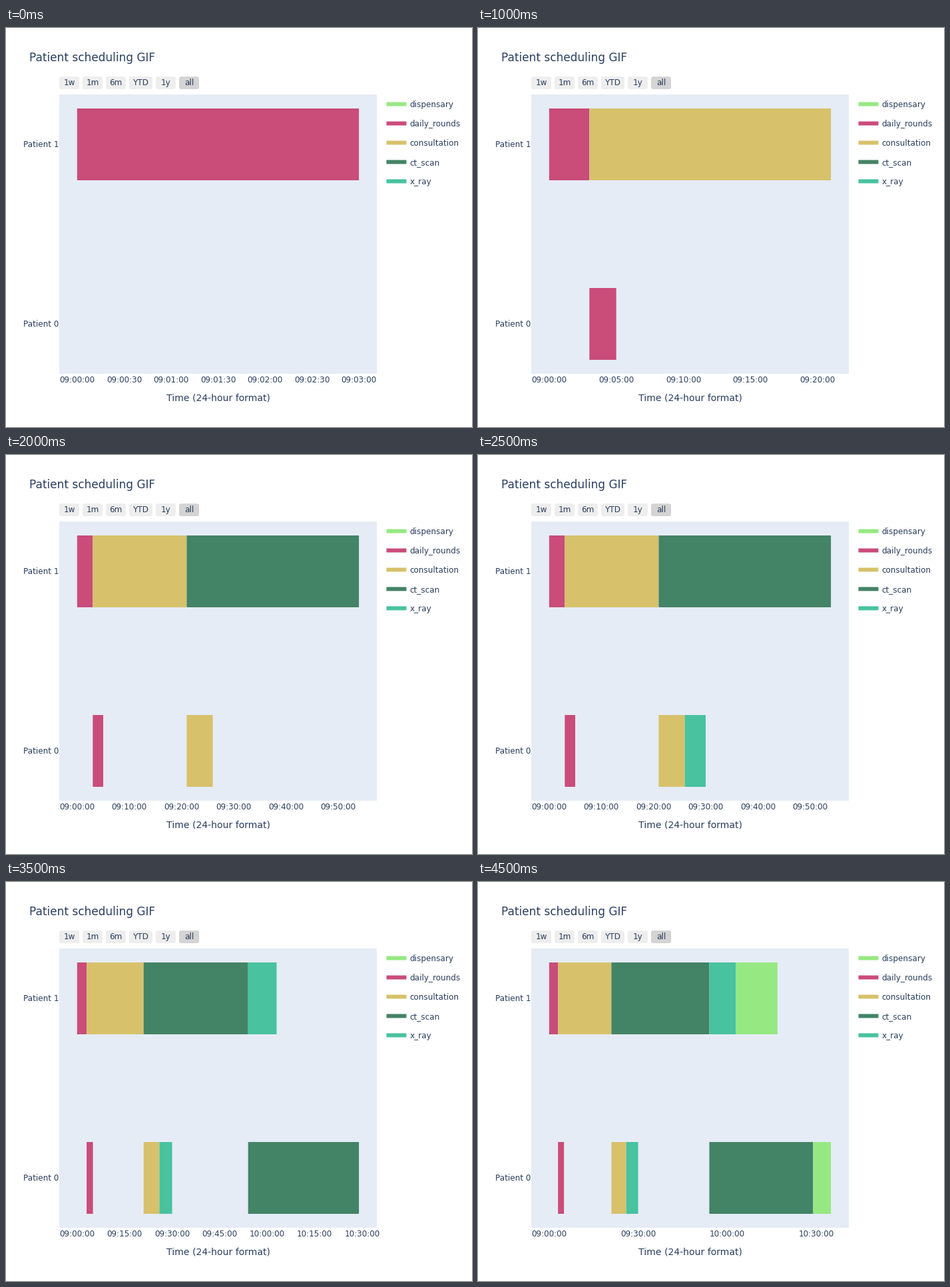
Animation, 700 px wide and 600 px high, one loop 5000 ms. Source, as a matplotlib script:

```python
import matplotlib.pyplot as plt
from matplotlib.animation import FuncAnimation
from matplotlib.patches import FancyBboxPatch, Rectangle

W, H, DPI = 700, 600, 100
INK = "#2a3f5f"
COLORS = {
    "dispensary": "#96e982",
    "daily_rounds": "#c94c79",
    "consultation": "#d7c16b",
    "ct_scan": "#438366",
    "x_ray": "#48c29f",
}
# (patient, task, start minute, end minute), in order of appearance
TASKS = [
    (1, "daily_rounds", 0, 3),
    (1, "consultation", 3, 21),
    (0, "daily_rounds", 3, 5),
    (0, "consultation", 21, 26),
    (1, "ct_scan", 21, 54),
    (0, "x_ray", 26, 30),
    (0, "ct_scan", 54, 89),
    (1, "x_ray", 54, 63),
    (1, "dispensary", 63, 77),
    (0, "dispensary", 89, 95),
]
STEPS = [0.5, 1, 2, 5, 10, 15, 30, 60]
PLOT_L, PLOT_T, PLOT_W, PLOT_H = 80, 100, 477, 420
PAD = 0.05 * PLOT_W + 3
ROW_Y = {1: 175, 0: 445}
BAR_H = 108

plt.rcParams.update({
    "font.family": "DejaVu Sans",
    "text.color": INK,
    "text.hinting": "force_autohint",
})
fig = plt.figure(figsize=(W / DPI, H / DPI), dpi=DPI, facecolor="white")
ax = fig.add_axes([0, 0, 1, 1])
ax.set_xlim(0, W)
ax.set_ylim(H, 0)
ax.axis("off")


def rect(x, y, w, h, color):
    box = Rectangle((x, y), w, h, facecolor=color, linewidth=0)
    box.set_snap(False)
    return ax.add_patch(box)


def label(x, y, text, size=12, ha="left"):
    return ax.text(x, y, text, fontsize=size * 72 / DPI, ha=ha, va="baseline")


def button(x, w, text, color):
    r = 3
    box = FancyBboxPatch((x + r, 73 + r), w - 2 * r, 19 - 2 * r,
                         boxstyle=f"round,pad={r}", facecolor=color,
                         linewidth=0)
    box.set_snap(False)
    ax.add_patch(box)
    label(x + w / 2, 86, text, ha="center")


def draw_static():
    label(35, 50, "Patient scheduling GIF", 17)
    label(318.5, 561, "Time (24-hour format)", 14, "center")
    rect(PLOT_L, PLOT_T, PLOT_W, PLOT_H, "#e5ecf6")

    x = PLOT_L
    for name in ["1w", "1m", "6m", "YTD", "1y", "all"]:
        w = 35 if name == "YTD" else 30
        button(x, w, name, "#d4d4d4" if name == "all" else "#eeeeee")
        x += w + 5

    for patient, y in ROW_Y.items():
        label(79, y + 4, f"Patient {patient}", ha="right")

    for i, (name, color) in enumerate(COLORS.items()):
        y = 114.5 + 29 * i
        rect(571.5, y - 3, 30, 6, color)
        label(606.5, y + 4.5, name)


def clock(minutes):
    s = round(minutes * 60)
    return f"{9 + s // 3600:02d}:{s // 60 % 60:02d}:{s % 60:02d}"


moving = []


def clear():
    while moving:
        moving.pop().remove()
    return []


def update(i):
    clear()
    shown = TASKS[:i + 1]
    scale = (PLOT_W - 2 * PAD) / max(end for *_, end in shown)
    span = PLOT_W / scale

    def px(t):
        return PLOT_L + PAD + t * scale

    for patient, task, start, end in shown:
        moving.append(rect(px(start), ROW_Y[patient] - BAR_H / 2,
                           (end - start) * scale, BAR_H, COLORS[task]))

    step = next(s for s in STEPS if span / s <= 7)
    t = 0
    while px(t) <= PLOT_L + PLOT_W:
        moving.append(label(px(t), 533, clock(t), ha="center"))
        t += step
    return moving


draw_static()
anim = FuncAnimation(fig, update, frames=len(TASKS), init_func=clear,
                     interval=500, repeat=True, repeat_delay=0, blit=False)
plt.show()
```
